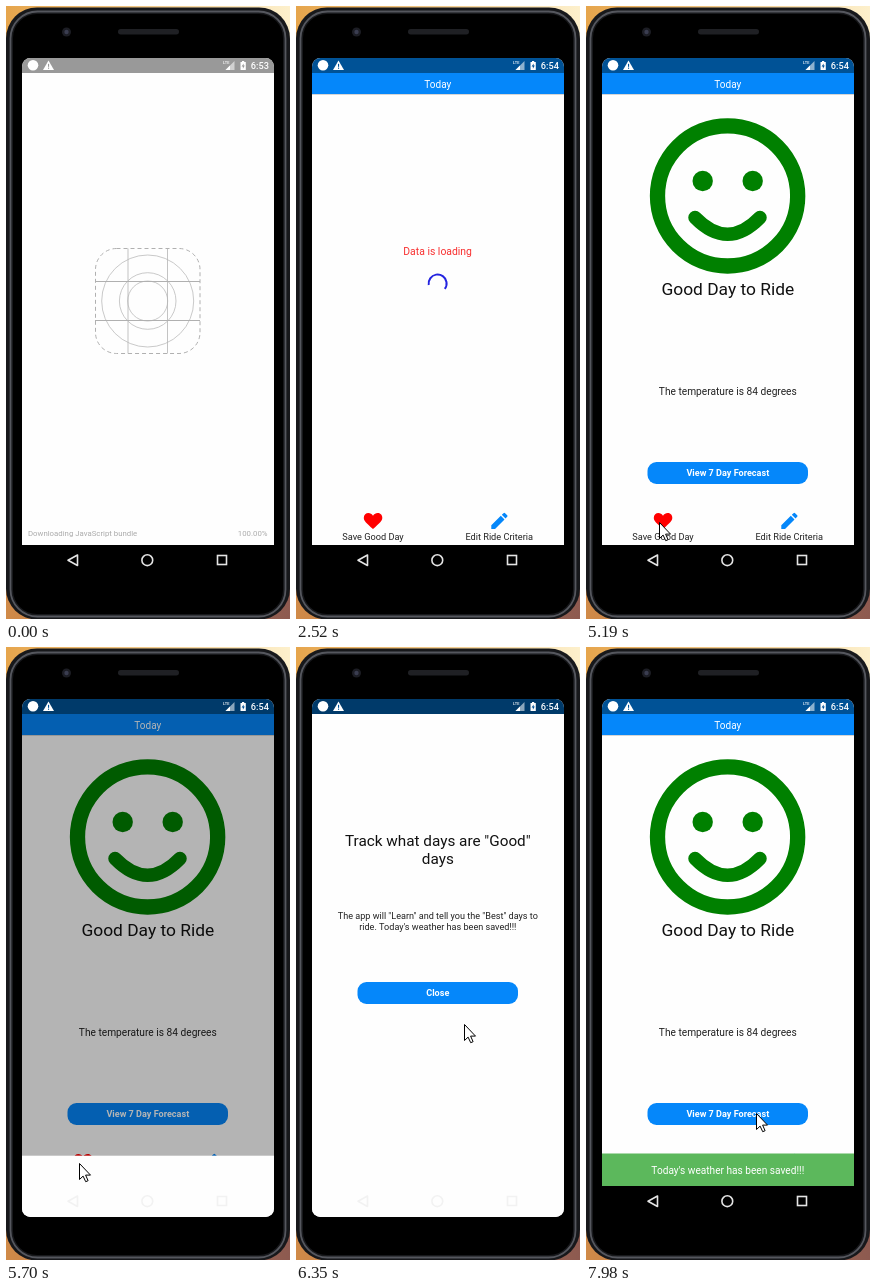
Recreate the animation shown at these times as an HTML page with a canvas. Size 284 px wide and 613 px high, loop 8000 ms.

```html
<!DOCTYPE html>
<html lang="en">
<head>
<meta charset="utf-8">
<title>Ride day app</title>
<style>
html, body { margin: 0; width: 100%; height: 100%; overflow: hidden; background: #000; }
canvas { display: block; width: 284px; height: 613px; }
</style>
</head>
<body>
<canvas id="stage"></canvas>
<script>
const LOOP = 8000, W = 284, H = 613, CX = 141.8;
const BOTTOM = 539, BLUE = '#0587fa', GREEN = '#008000';
const canvas = document.getElementById('stage');
const dpr = window.devicePixelRatio || 1;
canvas.width = W * dpr;
canvas.height = H * dpr;
const c = canvas.getContext('2d');

const clamp = v => Math.max(0, Math.min(1, v));
const smooth = v => v * v * (3 - 2 * v);
const sine = v => (1 - Math.cos(Math.PI * clamp(v))) / 2;
const rad = d => d * Math.PI / 180;

function rect(x, y, w, h, fill) {
  c.fillStyle = fill;
  c.fillRect(x, y, w, h);
}
function round(x, y, w, h, r, fill) {
  c.beginPath();
  c.roundRect(x, y, w, h, r);
  c.fillStyle = fill;
  c.fill();
}
function disc(x, y, r, fill) {
  c.beginPath();
  c.arc(x, y, r, 0, 7);
  c.fillStyle = fill;
  c.fill();
}
function ring(x, y, r, color, width) {
  c.beginPath();
  c.arc(x, y, r, 0, 7);
  line(color, width);
}
function line(color, width, path) {
  c.strokeStyle = color;
  c.lineWidth = width;
  path ? c.stroke(path) : c.stroke();
}
function shape(d, fill) {
  c.fillStyle = fill;
  c.fill(new Path2D(d));
}
function text(s, x, y, size, color, align = 'center', weight = 400) {
  c.font = `${weight} ${size}px Roboto, sans-serif`;
  c.textAlign = align;
  c.fillStyle = color;
  c.fillText(s, x, y);
}
function button(label, y) {
  round(61.5, y, 160.5, 22, 9, BLUE);
  text(label, CX, y + 14.4, 9.1, '#fff', 'center', 700);
}
function fade(from, to) {
  const g = c.createLinearGradient(0, 0, W, 0);
  g.addColorStop(0, from);
  g.addColorStop(1, to);
  return g;
}

function phone() {
  rect(0, 0, W, H / 2, fade('#e6a54c', '#fdf0cc'));
  rect(0, H / 2, W, H / 2, fade('#d08a48', '#8d5a50'));
  round(0, 1.5, W, 612, 31, '#17181b');
  c.beginPath();
  c.roundRect(4.5, 5.5, 275, 605, 27);
  line('#55575e', 1.8);
  round(7, 8, 270, 600, 24, '#000');
  round(112, 23, 61, 5.5, 2.7, '#1f2024');
  disc(60.5, 26, 4.5, '#1c1d24');
  disc(60.5, 26, 2.2, '#3a3d50');
}

function navigation(color) {
  c.lineJoin = 'round';
  line(color, 1.6, new Path2D('M71.5 549V559.5L62 554.2Z'));
  ring(141.3, 554.2, 5.4, color, 1.6);
  c.lineJoin = 'miter';
  c.strokeRect(211.5, 549.5, 9, 9);
}

function statusIcons(t, bar) {
  disc(27, 59.3, 5.3, '#fff');
  shape('M42.5 54.5L48 64H37Z', '#fff');
  rect(42, 57.8, 1.1, 3, bar);
  rect(42, 61.6, 1.1, 1.2, bar);
  text('LTE', 217, 57.5, 4, '#fff', 'left', 500);
  shape('M228.5 55V64H219.5Z', 'rgba(255,255,255,.55)');
  shape('M224 59.5V64H219.5Z', '#fff');
  shape('M234.5 56H236V55H238.2V56H239.8V64H234.5Z', '#fff');
  shape('M237.6 57.5L235.6 60.6H236.9V62.8L238.8 59.6H237.6Z', bar);
  text(t < 190 ? '6:53' : '6:54', 244.8, 62.8, 9.2, '#fff', 'left', 500);
}

function splash() {
  c.beginPath();
  c.roundRect(89.5, 242.5, 104.5, 105, 21);
  c.setLineDash([4, 3]);
  line('#b0b0b0', 1);
  c.setLineDash([]);
  for (const r of [46, 28.3, 20]) ring(141.7, 295, r, '#bbb', 0.8);
  line('#b4b4b4', 0.8, new Path2D('M122 242.5V347.5M161.5 242.5V347.5'));
  line('#b0b0b0', 1, new Path2D('M89 275.5H194M89 314.5H194'));
  text('Downloading JavaScript bundle', 22, 530, 7.8, '#aaa', 'left');
  text('100.00%', 261.5, 530, 7.8, '#aaa', 'right');
}

function spinner(t) {
  const cycles = (t - 2520) / 1333 + 2.357;
  const n = Math.floor(cycles), p = cycles - n;
  const head = smooth(clamp(2 * p)), tail = smooth(clamp(2 * p - 1));
  const start = 170 + (t - 2520) * 0.162 + 270 * (n - 2 + tail);
  c.beginPath();
  c.arc(141.6, 277.5, 9, rad(start), rad(start + 10 + 270 * (head - tail)));
  c.lineCap = 'butt';
  line('#2424e0', 2);
}

function smile() {
  ring(141.6, 189.9, 70.1, GREEN, 15.3);
  disc(116.7, 175, 10.2, GREEN);
  disc(166.7, 175, 10.2, GREEN);
  c.lineCap = 'round';
  line(GREEN, 13.5, new Path2D('M109 211.5Q141.6 245 174 211.5'));
  text('Good Day to Ride', CX, 289, 17.4, '#111');
  text('The temperature is 84 degrees', CX, 389, 10.2, '#222');
  button('View 7 Day Forecast', 456);
}

function tabs() {
  shape('M77 523C70 517 67.8 515 67.8 511.8C67.8 506.5 74.5 505.5 77 509.8C79.5 505.5 86.3 506.5 86.3 511.8C86.3 515 84 517 77 523Z', '#f00');
  shape('M195.3 523V519.3L204.8 509.8L208.5 513.5L199 523ZM205.8 508.8L207.5 507.2Q208.3 506.5 209.1 507.2L211.2 509.3Q211.9 510.1 211.2 510.8L209.5 512.5Z', BLUE);
  text('Save Good Day', 77, 534, 9.2, '#222');
  text('Edit Ride Criteria', 203.2, 534, 9.2, '#222');
}

function sheet(top) {
  rect(16, top, 252, 570 - top, '#fefefe');
  text('Track what days are "Good"', CX, top + 132, 15.3, '#111');
  text('days', CX, top + 149.5, 15.3, '#111');
  text('The app will "Learn" and tell you the "Best" days to', CX, top + 205.2, 9.1, '#222');
  text("ride. Today's weather has been saved!!!", CX, top + 216, 9.1, '#222');
  button('Close', top + 268);
}

// time, x, y of the pointer tip
const path = [
  [2900, 240, 611], [3660, 210, 489], [3710, 203, 486], [3760, 201, 482],
  [3989, 201, 482], [3990, 195, 482], [4300, 66, 511], [4630, 66, 511],
  [4940, 73, 516], [5800, 73, 516], [6500, 180, 359], [6680, 184, 353],
  [7120, 184, 353], [7800, 169, 458], [7980, 170, 466]
];
function pointer(t) {
  if (t < path[0][0]) return;
  let i = path.findIndex(k => k[0] > t);
  if (i < 0) i = path.length;
  const a = path[i - 1], b = path[i] || a;
  const f = a === b ? 0 : smooth((t - a[0]) / (b[0] - a[0]));
  const x = a[1] + (b[1] - a[1]) * f, y = a[2] + (b[2] - a[2]) * f;
  const pressed = (t >= 4960 && t < 5190) || (t >= 6690 && t < 6860);
  if (pressed) disc(x, y, 12, 'rgba(255,255,0,.47)');
  c.save();
  c.translate(Math.round(x) + 0.5, Math.round(y) + 0.5);
  const arrow = new Path2D('M0 0V16L3.6 12.6L6.2 18.2L8.6 17.2L6.1 11.6H11Z');
  c.fillStyle = '#fff';
  c.fill(arrow);
  line('#000', 1, arrow);
  c.restore();
}

function draw(t) {
  c.setTransform(dpr, 0, 0, dpr, 0, 0);
  phone();

  const app = t >= 840;
  const bar = app ? '#005296' : '#999';
  const modal = t >= 5700 && t < 7240;

  c.save();
  c.beginPath();
  c.roundRect(16, 52, 252, 518, 8.5);
  c.clip();
  rect(16, 52, 252, BOTTOM - 52, '#fefefe');
  rect(16, 52, 252, 15, bar);
  if (t < 650) splash();
  if (app) {
    rect(16, 88, 252, 1, '#d5d5d5');
    rect(16, 67, 252, 21, BLUE);
    text('Today', CX, 81.6, 10, '#fff');
    tabs();
    if (t < 2900) {
      text('Data is loading', 141.6, 249.3, 10.4, '#f83030');
      spinner(t);
    } else smile();
  }
  if (t >= 7100) {
    c.globalAlpha = clamp((t - 7100) / 200);
    rect(16, 506.5, 252, BOTTOM - 506.5, '#5cb85c');
    text("Today's weather has been saved!!!", CX, 526.5, 10.15, '#fff');
    c.globalAlpha = 1;
  }
  if (modal) {
    const dim = 0.293 * (1 - clamp((t - 7140) / 100));
    const up = t < 7000 ? sine((t - 5655.6) / 200) : 1 - sine((t - 7028.4) / 200);
    rect(16, 52, 252, BOTTOM - 52, `rgba(0,0,0,${dim})`);
    rect(16, BOTTOM, 252, 570 - BOTTOM, '#fefefe');
    sheet(570 - 503 * up);
  }
  c.restore();

  statusIcons(t, bar);
  navigation(modal ? '#f2f2f2' : '#e4e4e4');
  pointer(t);
}

function tick() {
  draw(performance.now() % LOOP);
  requestAnimationFrame(tick);
}
tick();
</script>
</body>
</html>
```
